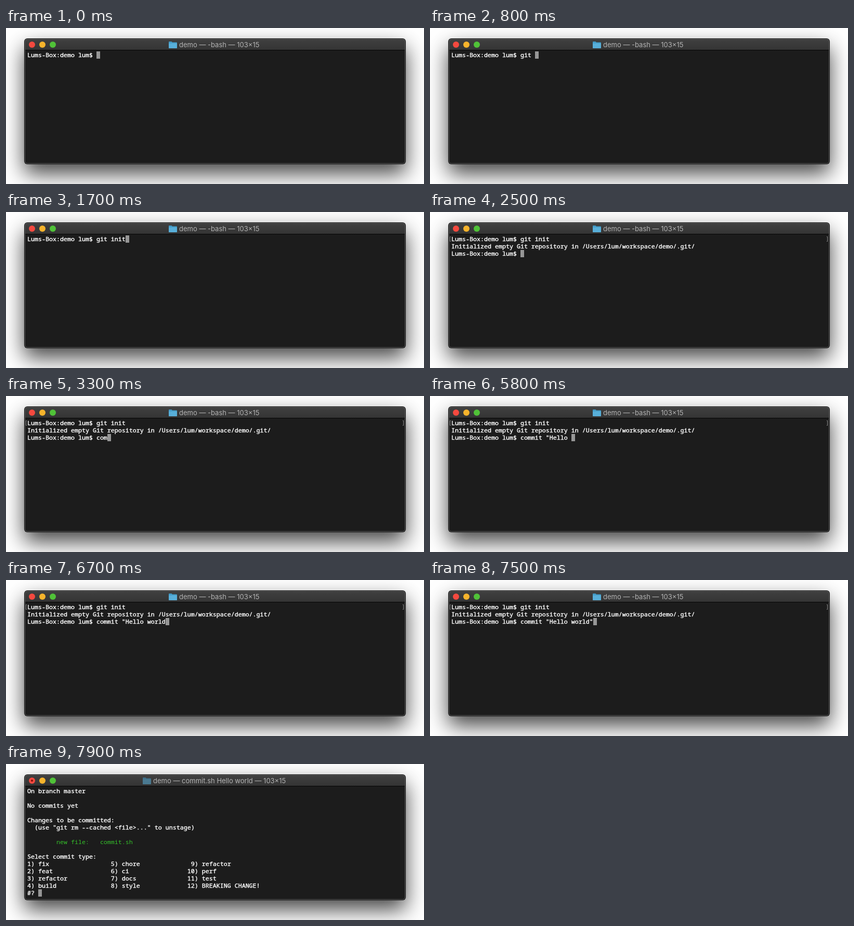
Recreate the animation shown at these times as an HTML page. Size 804 by 300 pixels, loop 8 s.

```html
<!DOCTYPE html>
<html lang="en">
<head>
<meta charset="utf-8">
<title>Terminal</title>
<style>
  html, body { margin: 0; width: 100%; height: 100%; overflow: hidden; background: #fff; }
  svg { display: block; width: 804px; height: 300px; }
  #shadow { filter: drop-shadow(0 18px 20px rgba(0, 0, 0, .73)); }
  #title { font: 13px Inter, sans-serif; fill: #b4b4b4; }
  #screen text {
    font: 11.667px "Noto Sans Mono", monospace;
    white-space: pre; fill: #fff; stroke: #fff; stroke-width: .4px;
  }
  #screen text.green { fill: #35c02a; stroke: none; }
  #marks { fill: none; stroke: #8c8c8c; }
</style>
</head>
<body>
<svg viewBox="0 0 804 300">
  <defs>
    <linearGradient id="bar" x2="0" y2="1">
      <stop stop-color="#404040"/><stop offset="1" stop-color="#343434"/>
    </linearGradient>
    <clipPath id="frame"><rect x="36" y="21" width="732" height="240" rx="5"/></clipPath>
  </defs>
  <rect id="shadow" x="35" y="20" width="734" height="242" rx="6" fill="#080808"/>
  <g clip-path="url(#frame)">
    <rect x="36" y="21" width="732" height="240" fill="#1c1c1c"/>
    <rect x="36" y="21" width="732" height="21" fill="url(#bar)"/>
    <rect x="36" y="42" width="732" height="1" fill="#050505"/>
  </g>
  <rect x="36.5" y="21.5" width="731" height="239" rx="4.5" fill="none" stroke="#606060"/>
  <circle cx="50" cy="32" r="6" fill="#f4493f"/>
  <circle id="busy" cx="50" cy="32" r="2" fill="#7c0f0a"/>
  <circle cx="70" cy="32" r="6" fill="#f6b32c"/>
  <circle cx="90" cy="32" r="6" fill="#50c238"/>
  <g id="heading">
    <g id="folder">
      <path d="M0 27q0-1 1-1h4.500l1.500 1.500h8q1 0 1 1v9.500q0 1-1 1h-14q-1 0-1-1z" fill="#429ac6"/>
      <path d="M0 29.500h16v8.500q0 1-1 1h-14q-1 0-1-1z" fill="#58afd9"/>
    </g>
    <text id="title" x="20" y="37"></text>
  </g>
  <path id="marks" d="M40 47.500h-1.500v9h1.500M763 47.500h1.500v9h-1.500"/>
  <rect id="cursor" width="7" height="14" fill="#969696"/>
  <g id="screen"></g>
</svg>
<script>
const LOOP = 8000, ENTER_INIT = 2000, ENTER_COMMIT = 7600;
const LEFT = 41, TOP = 45, CELL = 7, LINE = 14, GREEN_ROW = 7;
const PROMPT = "Lums-Box:demo lum$ ";

// One keystroke time per character
const init = { text: "git init", times: [300, 500, 600, 800, 1000, 1200, 1300, 1400] };
const commit = {
  text: 'commit "Hello world"',
  times: [2900, 3100, 3300, 3600, 3800, 4000, 4300, 4800, 5000, 5200,
          5300, 5400, 5600, 5800, 6000, 6200, 6300, 6400, 6600, 6900]
};

const types = ["fix", "feat", "refactor", "build", "chore", "ci", "docs", "style",
               "refactor", "perf", "test", "BREAKING CHANGE!"];
const option = i => `${i + 1}) ${types[i]}`;
// The third column is right-aligned on its numbers, so "9)" starts one cell later
const menu = [0, 1, 2, 3].map(i =>
  option(i).padEnd(23) + option(i + 4).padEnd(i ? 21 : 22) + option(i + 8));
const status = [
  "On branch master", "", "No commits yet", "", "Changes to be committed:",
  '  (use "git rm --cached <file>..." to unstage)', "",
  "        new file:   commit.sh", "", "Select commit type:", ...menu, "#? "
];

const $ = id => document.getElementById(id);
const rows = Array.from({ length: 15 }, (_, i) => {
  const row = document.createElementNS("http://www.w3.org/2000/svg", "text");
  row.setAttribute("x", LEFT);
  row.setAttribute("y", TOP + 11 + i * LINE);
  return $("screen").appendChild(row);
});

const typed = (line, t) => PROMPT + line.text.slice(0, line.times.filter(k => k <= t).length);

function linesAt(t) {
  if (t >= ENTER_COMMIT) return status;
  if (t < ENTER_INIT) return [typed(init, t)];
  return [
    typed(init, t),
    "Initialized empty Git repository in /Users/lum/workspace/demo/.git/",
    typed(commit, t)
  ];
}

function draw(t) {
  const lines = linesAt(t), running = t >= ENTER_COMMIT, last = lines.length - 1;
  rows.forEach((row, i) => row.textContent = lines[i] || "");
  rows[GREEN_ROW].setAttribute("class", running ? "green" : "");
  $("cursor").setAttribute("x", LEFT + lines[last].length * CELL);
  $("cursor").setAttribute("y", TOP + last * LINE);
  $("marks").style.display = t >= ENTER_INIT && !running ? "" : "none";
  $("busy").style.display = running ? "" : "none";
  $("folder").style.opacity = running ? .55 : 1;
  $("heading").setAttribute("transform", `translate(${running ? 263 : 313} 0)`);
  $("title").textContent = `demo — ${running ? "commit.sh Hello world" : "-bash"} — 103×15`;
}

const start = performance.now();
function tick() {
  draw((performance.now() - start) % LOOP);
  requestAnimationFrame(tick);
}
tick();
</script>
</body>
</html>
```
